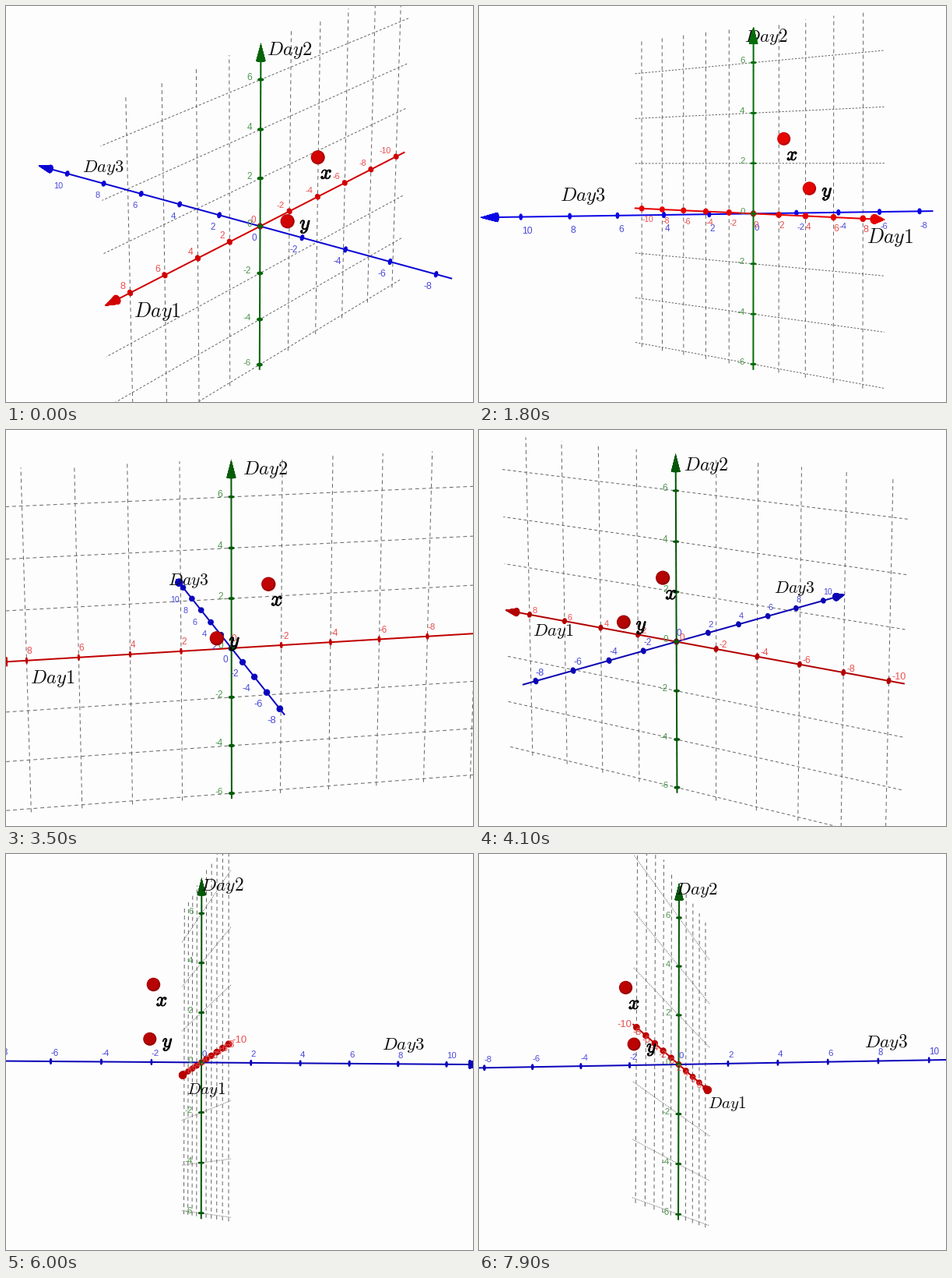
Recreate the animation shown at these times as a matplotlib script. Size 600 px wide and 508 px high, loop 8000 ms.

```python
import matplotlib.pyplot as plt
import numpy as np
from matplotlib import patheffects
from matplotlib.animation import FuncAnimation
from matplotlib.collections import LineCollection, PolyCollection

W, H, DPI = 600, 508, 100
PX = 72 / DPI
STEP, COUNT = 100, 80

plt.rcParams.update({
    "font.family": "Liberation Sans",
    "mathtext.fontset": "cm",
    "lines.scale_dashes": False,
})

# Camera: pivot of the orbit, pixels per unit, eye distance in units
PIVOT = np.array([-0.664, 0.37, 1.4745])
SCALE, EYE = 32.3, 76.5
CENTER = np.array([300.5, 254.5])

# Orbit path: time in ms, azimuth and elevation in degrees
TIMES = np.array([500, 1800, 2500, 3500, 4800, 6000, 6850, 7900])
AZIMUTH = np.array([126.4, 61.5, 99.4, 167.5, 258.4, 263.4, 269, 277.5])
ELEVATION = np.array([21.2, 1.2, 8.2, 15.2, 7.2, -4, -10.3, -7.9])

LOW, HIGH = (-10.65, -6.2, -8.65), (9.4, 7.4, 11.6)
TICKS = (range(-10, 9, 2), range(-6, 7, 2), range(-8, 11, 2))
LABEL_COLORS = ("#e85050", "#4f974f", "#4a4ad8")


def tangents(values):
    slope = np.diff(values) / np.diff(TIMES)
    left, right = slope[:-1], slope[1:]
    same = left * right > 0
    total = np.where(same, left + right, 1)
    inner = np.where(same, 2 * left * right / total, 0)
    return np.concatenate([[0], inner, slope[-1:]])


def follow(values, t):
    """Cubic path through the key values without overshoot."""
    t = np.clip(t, TIMES[0], TIMES[-1])
    i = min(np.searchsorted(TIMES, t, side="right") - 1, len(TIMES) - 2)
    span = TIMES[i + 1] - TIMES[i]
    u = (t - TIMES[i]) / span
    m = tangents(values) * span
    return ((1 + 2 * u) * (1 - u) ** 2 * values[i] + u * (1 - u) ** 2 * m[i]
            + u * u * (3 - 2 * u) * values[i + 1] + u * u * (u - 1) * m[i + 1])


class Camera:
    def __init__(self, t):
        self.azimuth = follow(AZIMUTH, t)
        theta = np.radians(self.azimuth)
        phi = np.radians(follow(ELEVATION, t))
        self.a, self.b = np.cos(theta), np.sin(theta)
        self.up, self.tilt = np.cos(phi), np.sin(phi)

    def project(self, points):
        q = np.asarray(points, float) - PIVOT
        x = self.a * q[..., 0] - self.b * q[..., 2]
        near = self.b * q[..., 0] + self.a * q[..., 2]
        y = q[..., 1] * self.up - near * self.tilt
        z = q[..., 1] * self.tilt + near * self.up
        k = 1 / (1 - z / EYE)
        xy = np.stack([x, -y], -1) * SCALE * k[..., None] + CENTER
        return xy, k


def on_axis(axis, value):
    p = np.zeros(3)
    p[axis] = value
    return p


def ring(axis, value, radius):
    angle = np.linspace(0, 2 * np.pi, 25)
    p = np.zeros((25, 3))
    p[:, axis] = value
    p[:, (axis + 1) % 3] = radius * np.cos(angle)
    p[:, (axis + 2) % 3] = radius * np.sin(angle)
    return p


def draw_grid(cam):
    columns = [[(d, -6.15, 0), (d, 7.45, 0)] for d in TICKS[0]]
    rows = [[(LOW[0], d, 0), (HIGH[0], d, 0)] for d in TICKS[1] if d]
    squeeze = abs(cam.a)
    row_dash = (max(1, 5 * squeeze) * PX, max(1.3, 4 * squeeze) * PX)
    for lines, dash in ((columns, (5 * PX, 4 * PX)), (rows, row_dash)):
        ax.add_collection(LineCollection(
            cam.project(lines)[0], colors="#666666", linewidths=PX,
            linestyles=[(0, dash)], zorder=1))


def draw_axis(cam, axis, color):
    line, _ = cam.project([on_axis(axis, LOW[axis]),
                           on_axis(axis, HIGH[axis] - 0.5)])
    ax.plot(*line.T, color=color, lw=2 * PX, zorder=3)

    discs = [cam.project(ring(axis, v, 0.09))[0] for v in TICKS[axis]]
    ax.add_collection(PolyCollection(
        discs, facecolors=color, edgecolors=color, linewidths=2.3 * PX,
        joinstyle="round", zorder=3))

    tip, _ = cam.project(on_axis(axis, HIGH[axis]))
    base, _ = cam.project(ring(axis, HIGH[axis] - 0.65, 0.17))
    sides = [[tip, p, q] for p, q in zip(base, base[1:])]
    ax.add_collection(PolyCollection(
        sides + [base], facecolors=color, edgecolors=color,
        linewidths=0.5 * PX, zorder=3))


def label_offset(axis, azimuth):
    """Edge of the tick text relative to its tick, by viewing sector."""
    if axis == 0:
        sector = np.searchsorted([90, 150, 195, 270], azimuth)
        return [(0, 14), (-6, -8), (0, -12), (4, -5), (-6, -4)][sector]
    if axis == 1:
        return -11, -3
    sector = np.searchsorted([115, 185], azimuth)
    return [(1, 18), (-5, 15), (0, -11)][sector]


def draw_tick_labels(cam, axis):
    dx, dy = label_offset(axis, cam.azimuth)
    for v in TICKS[axis]:
        (x, y), k = cam.project(on_axis(axis, v))
        ax.text(x + dx, y + dy + 3.5, str(v), color=LABEL_COLORS[axis],
                size=11.5 * k * PX, ha="right" if dx < 0 else "left",
                va="baseline", zorder=4)


def draw_name(cam, name, anchor, dx, dy, zorder):
    (x, y), k = cam.project(anchor)
    ax.text(x + dx * k, y + dy * k, f"${name}$", size=23.5 * k * PX,
            color="#111111", va="baseline", zorder=zorder)


def draw_ball(cam, name, point, dx, dy, light):
    (x, y), k = cam.project(point)
    r = 8.7 * k
    ax.add_patch(plt.Circle((x, y), r, color=(0.82 * light, 0, 0), lw=0, zorder=6))
    ax.add_patch(plt.Circle((x - 0.08 * r, y - 0.08 * r), 0.84 * r,
                            color=(light, 0.01, 0.01), lw=0, zorder=6))
    bold = patheffects.withStroke(linewidth=0.9 * PX, foreground="black")
    ax.text(x + dx, y + dy, f"${name}$", size=25 * k * PX, color="black",
            ha="center", va="baseline", zorder=7, path_effects=[bold])


def draw(i):
    cam = Camera(i * STEP)
    light = 0.8 + 0.1 * np.cos(np.radians(cam.azimuth - 50))
    ax.clear()
    ax.set(xlim=(0, W), ylim=(H, 0))
    ax.axis("off")

    draw_grid(cam)
    colors = ((light, 0, 0), (0.02, 0.48 * light, 0.03), (0.04, 0.02, light))
    for axis in (2, 0, 1):
        draw_axis(cam, axis, colors[axis])
        draw_tick_labels(cam, axis)

    draw_name(cam, "Day1", (8, 0, 0), 4, 28.5, 5)
    draw_name(cam, "Day2", (-0.53, 7.05, 0), -3, 6.7, 2 if cam.b > 0 else 5)
    draw_name(cam, "Day3", (0.46, 0, 8), -18.5, -19.3, 5)
    draw_ball(cam, "x", (-1, 3, -2), 11, 27.5, light)
    draw_ball(cam, "y", (1, 1, -2), 23, 10.3, light)
    return []


fig = plt.figure(figsize=(W / DPI, H / DPI), dpi=DPI, facecolor="#fefdfe")
ax = fig.add_axes([0, 0, 1, 1])
anim = FuncAnimation(fig, draw, frames=COUNT, interval=STEP,
                     init_func=lambda: [], repeat=True, repeat_delay=0)
plt.show()
```
